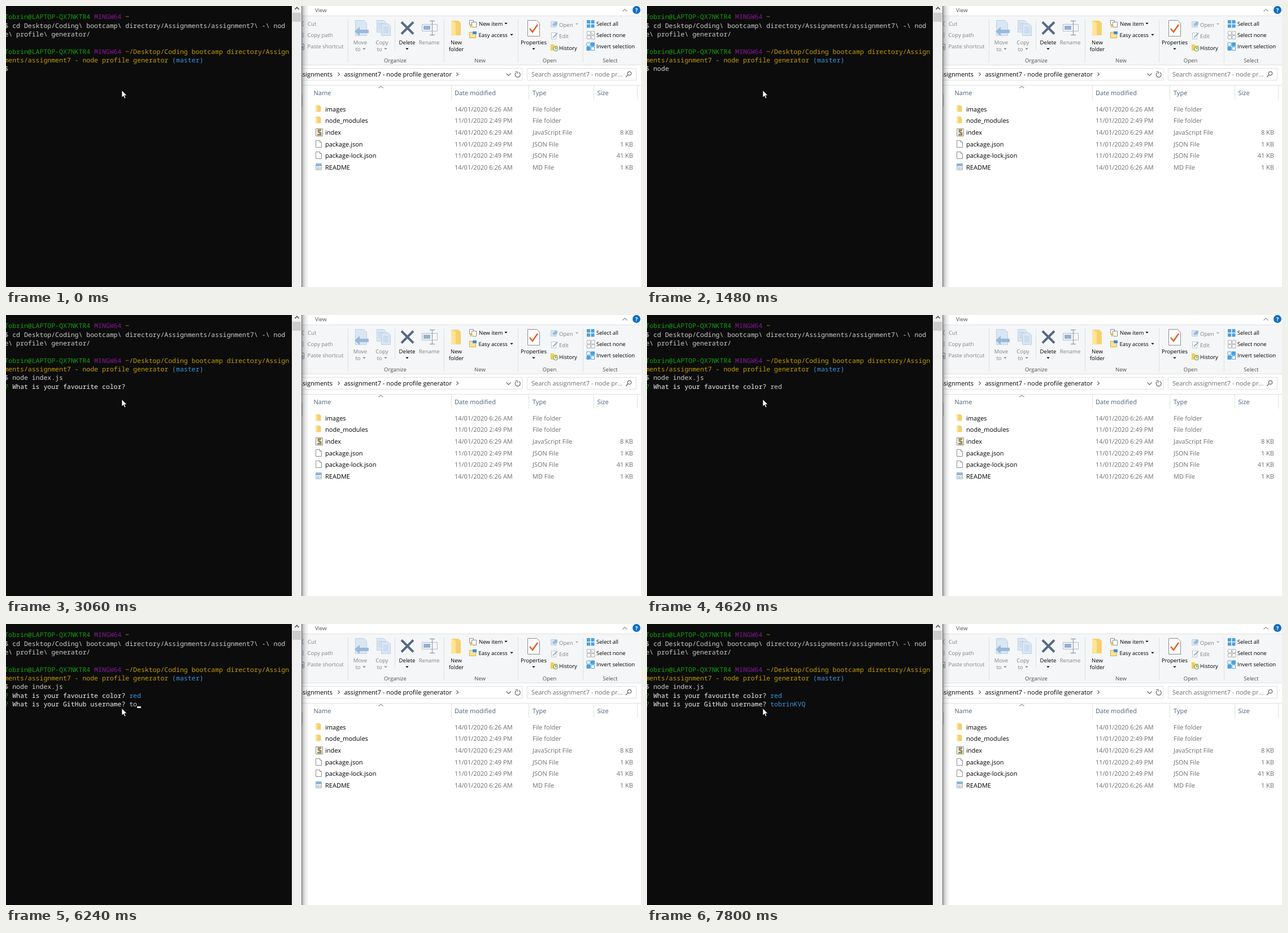
An HTML page for the animation above (8000 ms loop, 1124 px wide and 498 px high).

```html
<!DOCTYPE html>
<html lang="en">
<head>
<meta charset="utf-8">
<title>Profile generator in a terminal</title>
<style>
  html, body { margin: 0; width: 100%; height: 100%; overflow: hidden; background: #fff; }
  svg { display: block; width: 1124px; height: 498px; }
  text { font-family: "Open Sans", "Noto Sans", sans-serif; font-size: 11px; white-space: pre; text-rendering: geometricPrecision; }
  .ribbon text { font-size: 9.55px; }
  .mid { text-anchor: middle; }
  .end { text-anchor: end; }
  .off { fill: #838383; }
  .label { fill: #4f4f4f; }
  .head { fill: #4c607a; }
  .info { fill: #6d6d6d; }
  .rule { stroke: #dfe0e1; fill: none; }
  .thin { fill: none; stroke: #666; stroke-width: 1.2; }
  .page { fill: #fff; stroke: #8c8c8c; }
  .pale { fill: #d9e6f3; stroke: #bcd1e5; }
  .terminal text { font: 11.5px "Noto Sans Mono", "DejaVu Sans Mono", monospace; }
</style>
</head>
<body>
<svg viewBox="0 0 1124 498">
  <defs>
    <linearGradient id="shadow">
      <stop offset="0" stop-opacity=".34"/>
      <stop offset=".5" stop-opacity=".1"/>
      <stop offset="1" stop-opacity="0"/>
    </linearGradient>
    <path id="down" d="M-2.7-1.3h5.4L0 1.5z"/>
    <path id="chevron" class="thin" d="M-1.5-3L1.5 0-1.5 3"/>
    <g id="folder">
      <path fill="#f6d06c" d="M0 0h7l2.500 2v9.500H0z"/>
      <path fill="#ffe59c" d="M0 1h3v10.500H0z"/>
    </g>
    <g id="page"><path class="page" d="M.5.5h7l3 3v9h-10z"/><path class="page" d="M7.5.5v3h3"/></g>
    <path id="tiles" d="M0 0h6v6H0zM7.5 0h6v6h-6zM0 7.5h6v6H0zM7.5 7.5h6v6h-6z"/>
  </defs>

  <rect width="1124" height="498" fill="#fff"/>

  <g class="ribbon">
    <text x="547" y="10.7" class="label">View</text>
    <path class="thin" stroke-opacity=".7" d="M1091.5 9.5l4-4 4 4"/>
    <circle cx="1116" cy="7" r="7" fill="#0f6fc5"/>
    <text x="1116" y="10.8" class="mid" fill="#fff" font-weight="700">?</text>

    <rect x="523" y="17" width="601" height="87" fill="#f5f6f7"/>
    <path class="rule" d="M523 17.5h601M523 104.5h601M605.5 24v76M688.5 24v54M775.5 24v76M906.5 24v76M1021.5 24v76"/>

    <path fill="none" stroke="#a9bdd3" stroke-width="1.3" d="M520 27l7 9M527 27l-7 9"/>
    <path class="pale" d="M517.5 47.5h9v8h-9z"/>
    <path class="page" d="M517.5 67.5h10v10h-10z"/>
    <path fill="#8eacd0" d="M521 71h5v5h-5z"/>
    <g class="off">
      <text x="534" y="35">Cut</text>
      <text x="533.5" y="55">Copy path</text>
      <text x="533.5" y="75">Paste shortcut</text>
    </g>

    <path class="pale" d="M618.5 25.5h15l5 5v22h-20z"/>
    <path fill="#98b9da" d="M617 45l9-8v5h16v6h-16v5z"/>
    <path class="pale" d="M656.5 25.5h12l4 4v17h-16z"/>
    <path class="pale" d="M664.5 31.5h12l4 4v17h-16z"/>
    <path stroke="#b3cbe2" d="M668 38h9M668 41h9M668 44h9M668 47h9M659 31h8M659 34h4M659 37h4M659 40h4"/>
    <path fill="none" stroke="#566a86" stroke-width="4" d="M700 28.5l21 21M721 28.5l-21 21"/>
    <path fill="#f5f6f7" stroke="#b0bac4" d="M736.5 32.5h27v12h-27z"/>
    <path fill="#94b0d1" d="M739 35h12v7h-12z"/>
    <path fill="none" stroke="#9aa5b1" stroke-width="1.3" d="M750 26.5h9M754.5 26.5v25M750 51.5h9"/>
    <g class="mid">
      <text x="627" y="68" class="off">Move</text>
      <text x="623" y="80" class="off">to</text>
      <text x="665.5" y="68" class="off">Copy</text>
      <text x="661" y="80" class="off">to</text>
      <text x="710" y="68">Delete</text>
      <text x="749" y="68" class="off">Rename</text>
      <text x="797" y="68">New</text>
      <text x="797" y="80">folder</text>
      <text x="934" y="68">Properties</text>
    </g>
    <use href="#down" x="634" y="76" class="off"/>
    <use href="#down" x="672" y="76" class="off"/>
    <use href="#down" x="710" y="76"/>
    <use href="#down" x="934" y="76"/>

    <path fill="#f6d06c" d="M788 26h13l4 4v22h-17z"/>
    <path fill="#ffe59c" d="M788 26l8 4v22l-8-1z"/>
    <path class="page" d="M820.5 25.5h7v8h-7z"/>
    <path class="page" d="M824.5 28.5h8v9h-8z"/>
    <path fill="#f3c95e" d="M821 34h5v4h-5z"/>
    <path fill="#ffe295" stroke="#d5ad4a" d="M820.5 46.5h6l1 2h4v8h-11z"/>
    <path fill="#3f8fd0" d="M826 45h7v5h-7z"/>
    <text x="837" y="35">New item</text>
    <text x="836.5" y="55">Easy access</text>
    <use href="#down" x="885" y="31"/>
    <use href="#down" x="895" y="51"/>

    <path class="page" d="M923.5 25.5h16l5 5v23h-21z"/>
    <path fill="none" stroke="#e4622d" stroke-width="2.6" d="M927 40l5 6 9-13"/>
    <path class="pale" d="M964.5 27.5h10v10h-10z"/>
    <path fill="#9bbbd9" d="M967 33l5-5h4v5l-6 3z"/>
    <path class="page" stroke-opacity=".5" d="M965.5 47.5h8v11h-8z"/>
    <path stroke="#8eacd0" stroke-width="2" d="M968 56l8-8"/>
    <path fill="#f5cb5c" d="M964 68h5l1 2h6v9h-12z"/>
    <circle cx="973" cy="76" r="4" fill="#e8f3e4" stroke="#5f9d59"/>
    <path fill="none" stroke="#456" d="M973 73.5V76h2"/>
    <text x="979" y="36.5" class="off">Open</text>
    <use href="#down" x="1010.5" y="32" fill="#aaa"/>
    <text x="979" y="56.5" class="off">Edit</text>
    <text x="979" y="77.5">History</text>

    <use href="#tiles" x="1028" y="25" fill="#4ba0dd"/>
    <use href="#tiles" x="1028.5" y="45" fill="#fff" stroke="#a9adb2"/>
    <use href="#tiles" x="1028" y="65" fill="#fff" stroke="#4ba0dd"/>
    <path fill="#4ba0dd" d="M1035.5 65h6v6h-6zM1028 72.5h6v6h-6z"/>
    <text x="1045" y="35">Select all</text>
    <text x="1045" y="55">Select none</text>
    <text x="1045" y="75">Invert selection</text>

    <g class="mid label">
      <text x="689" y="99.5">Organize</text>
      <text x="839" y="99.5">New</text>
      <text x="962" y="99.5">Open</text>
      <text x="1069.5" y="99.5">Select</text>
    </g>
  </g>

  <path class="rule" d="M500 110.5h414v21H500M922.5 110.5h193v21h-193zM523 140.5h601M788.5 141v25M925.5 141v25M1040.5 141v25M1117.5 141v25"/>
  <text x="578" y="125" class="end">Assignments</text>
  <use href="#chevron" x="589" y="121"/>
  <text x="598.5" y="125">assignment7 - node profile generator</text>
  <use href="#chevron" x="799" y="121"/>
  <path class="thin" d="M885.5 119.5l4 4 4-4"/>
  <path class="thin" d="M907.5 117.5a4.500 4.500 0 1 1-5 1M901.500 116.500h3.500v3.500"/>
  <text x="930" y="125" class="info">Search assignment7 - node pr...</text>
  <circle class="thin" cx="1103.5" cy="119.5" r="3.2"/>
  <path class="thin" d="M1101 122l-4 4"/>
  <path class="thin" stroke-opacity=".7" d="M659.5 145.5l4-3.5 4 3.5"/>

  <g class="head">
    <text x="544.5" y="157.5">Name</text>
    <text x="794" y="157.5">Date modified</text>
    <text x="932" y="157.5">Type</text>
    <text x="1046.5" y="157.5">Size</text>
  </g>
  <g id="files"></g>

  <rect x="523" y="156" width="2" height="22" fill="#cdcdcd"/>
  <rect x="523" width="13" height="498" fill="url(#shadow)"/>

  <g class="terminal">
    <rect width="506" height="498" fill="#0c0c0c"/>
    <rect x="506" width="17" height="498" fill="#f0f0f0"/>
    <rect x="507" y="12" width="15" height="16" fill="#cdcdcd"/>
    <path fill="none" stroke="#505050" stroke-width="1.6" d="M511.500 6l3.500-3.500L518.500 6"/>
    <rect x="523" width="1" height="498" fill="#6c6c6c"/>
    <g id="screen"></g>
    <path fill="#fff" stroke="#000" stroke-width=".6" d="M205 149.5v12.5l2.900-2.700 2 4.500 2-.9-2-4.300h3.900z"/>
  </g>
</svg>
<script>
const files = [
  ['images', '14/01/2020 6:26 AM', 'File folder', ''],
  ['node_modules', '11/01/2020 2:49 PM', 'File folder', ''],
  ['index', '14/01/2020 6:29 AM', 'JavaScript File', '8 KB'],
  ['package.json', '11/01/2020 2:49 PM', 'JSON File', '1 KB'],
  ['package-lock.json', '11/01/2020 2:49 PM', 'JSON File', '41 KB'],
  ['README', '14/01/2020 6:26 AM', 'MD File', '1 KB'],
];
const script = '<path fill="#fbf8ec" stroke="#8c8c8c" d="M.5.5h12v13h-12z"/>' +
  '<path fill="none" stroke="#444" stroke-width="2.6" d="M10 3H5v3l4 2v3H3"/>' +
  '<path fill="none" stroke="#e9bd35" stroke-width="1.2" d="M10 3H5v3l4 2v3H3"/>';
const notes = '<path fill="#f4f8fc" stroke="#9bb5cf" d="M.5.5h10v11h-10z"/>' +
  '<path fill="#86b8e4" d="M1 1h9v4H1z"/><path stroke="#9ab" d="M2 7.5h5M2 9.5h5"/><path fill="#e2b54d" d="M8 7h1.500v3H8z"/>';

function fileIcon(name, type) {
  if (type === 'File folder') return '<use href="#folder"/>';
  return { index: script, README: notes }[name] || '<use href="#page"/>';
}

document.getElementById('files').innerHTML = files.map(([name, date, type, size], i) => {
  const y = 186.6 + i * 20.65;
  return `<g transform="translate(548 ${Math.round(y - 11)})">${fileIcon(name, type)}</g>
    <text x="565" y="${y}">${name}</text>
    <g class="info"><text x="794" y="${y}">${date}</text><text x="932" y="${y}">${type}</text>
    <text x="1110" y="${y}" class="end">${size}</text></g>`;
}).join('');

const LEFT = -2.6, CELL = 6.9, ROW = 15.33, LOOP = 8000;
const GREEN = '#13a10e', PURPLE = '#881798', GOLD = '#c19c00', BLUE = '#3a96dd', GREY = '#ccc', WHITE = '#f2f2f2';
const rowBase = row => 23.3 + row * ROW;

const line = (row, ...spans) => `<text x="${LEFT}" y="${rowBase(row)}">` +
  spans.map(([color, text]) => `<tspan fill="${color}">${text}</tspan>`).join('') + '</text>';
const prompt = (row, path) => line(row, [GREEN, 'Tobrin@LAPTOP-QX7NKTR4 '], [PURPLE, 'MINGW64 '], [GOLD, path]);
const question = (row, text, color, answer) => line(row, [GREEN, '? '], [WHITE, text + ' '], [color, answer]);

const COLOR = 'What is your favourite color?', USER = 'What is your GitHub username?';
const history = prompt(0, '~') +
  line(1, [GREY, String.raw`$ cd Desktop/Coding\ bootcamp\ directory/Assignments/assignment7\ -\ nod`]) +
  line(2, [GREY, String.raw`e\ profile\ generator/`]) +
  prompt(4, '~/Desktop/Coding bootcamp directory/Assign') +
  line(5, [GOLD, 'ments/assignment7 - node profile generator '], [BLUE, '(master)']);

// Stages: 0 command, 1 starting, 2 first question, 3 answered, 4 second question, 5 done.
// [start ms, stage, input]; a trailing underscore means the caret is visible.
const steps = [
  [0, 0, ''], [170, 0, '_'], [240, 0, 'n_'], [320, 0, 'no_'], [400, 0, 'nod_'], [470, 0, 'node_'],
  [930, 0, 'node'], [1100, 0, 'node _'], [1480, 0, 'node '], [1650, 0, 'node i_'], [1720, 0, 'node in_'],
  [1890, 0, 'node index.js _'], [1960, 1, ''], [2510, 1, '_'],
  [3060, 2, ''], [3610, 2, '_'], [4160, 2, ''], [4310, 2, 'r_'], [4390, 2, 're_'], [4620, 2, 'red'],
  [5080, 3, ''], [5160, 4, ''], [5690, 4, '_'], [6090, 4, 't_'], [6240, 4, 'to_'], [6320, 4, 'tob_'],
  [6390, 4, 'tobr_'], [6470, 4, 'tobri_'], [6700, 4, 'tobrin_'], [6780, 4, 'tobrin'],
  [6950, 4, 'tobrinK_'], [7100, 4, 'tobrinKV_'], [7250, 4, 'tobrinKVQ'], [7730, 5, '_'], [7800, 5, ''],
];

function draw([, stage, input]) {
  const caretOn = input.endsWith('_');
  const typed = input.replace('_', '');
  let out = history + line(6, [GREY, '$ ' + (stage ? 'node index.js' : typed)]);
  if (stage > 1) out += stage > 2 ? question(7, COLOR, BLUE, 'red') : question(7, COLOR, GREY, typed);
  if (stage > 3) out += stage > 4 ? question(8, USER, BLUE, 'tobrinKVQ') : question(8, USER, GREY, typed);
  if (caretOn) {
    const column = [2, 0, 32, 0, 32, 0][stage] + typed.length;
    const row = 6 + Math.ceil(stage / 2);
    out += `<rect x="${LEFT + column * CELL}" y="${rowBase(row)}" width="${CELL}" height="3" fill="${WHITE}"/>`;
  }
  return out;
}

const screen = document.getElementById('screen');
const start = performance.now();
let shown;
function tick() {
  const t = (performance.now() - start) % LOOP;
  const step = steps.findLast(([from]) => from <= t);
  if (step !== shown) screen.innerHTML = draw(shown = step);
  requestAnimationFrame(tick);
}
tick();
</script>
</body>
</html>
```
